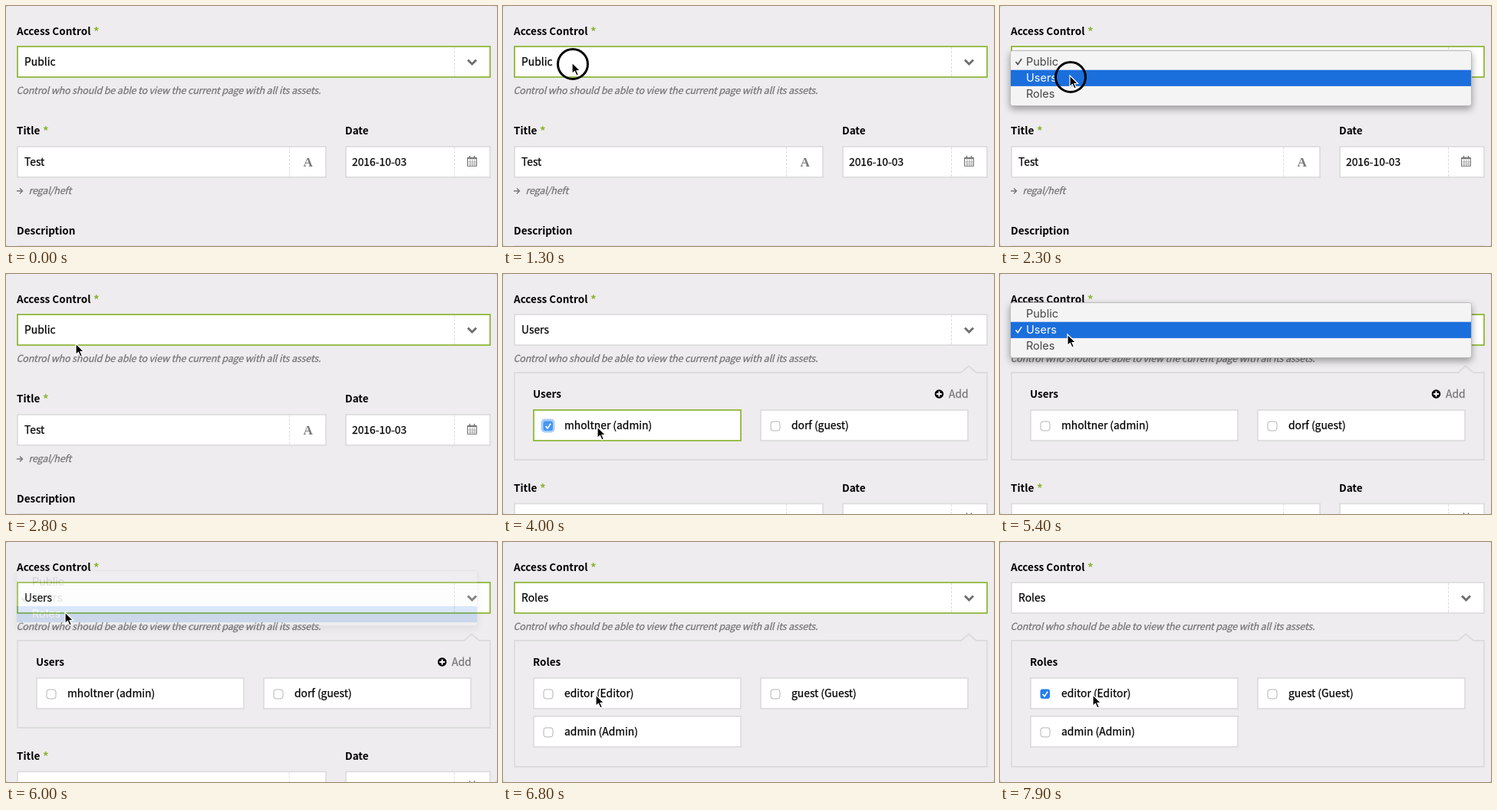
Recreate the animation shown at these times as an HTML page. Size 640x314 px, loop 8000 ms.

```html
<!DOCTYPE html>
<html lang="en">
<head>
<meta charset="utf-8">
<title>Access control form</title>
<style>
html, body { margin: 0; width: 100%; height: 100%; overflow: hidden; background: #d6d5d6; }
svg { display: block; width: 640px; height: 314px; }
text {
  font: 13.85px "Noto Sans CJK JP", "Noto Sans CJK SC", "Noto Sans CJK", "Noto Sans", sans-serif;
  fill: #000; stroke: #000; stroke-width: .25px;
}
.b { font-weight: bold; font-size: 13.5px; stroke: none; }
.star { font-weight: bold; font-size: 15px; fill: #8ab432; stroke: none; }
.i { font-style: italic; font-size: 12.5px; letter-spacing: -.15px; fill: #747474; stroke: #747474; }
.grey { fill: #777; stroke: #777; }
.serif { font: bold 17px "Liberation Serif", serif; fill: #777; stroke: none; }
.menu text { font: 14.5px Inter, sans-serif; fill: #444; stroke: none; }
.menu .on { fill: #fff; }
</style>
</head>
<body>
<svg id="stage" viewBox="0 0 640 314"></svg>
<script>
const LOOP = 8000, STEP = 100, ROW = 21.2;
const GREEN = '#8ab432', LINE = '#dddcdd', PAGE = '#eeecee';
const stage = document.getElementById('stage');

// Cursor tip: time, x, y
const path = [
  [200, 250, 296], [1100, 90, 74], [1500, 90, 74], [2000, 91, 91], [2900, 91, 91],
  [3400, 123, 200], [4500, 123, 200], [4900, 88, 73], [5200, 88, 74], [5400, 88, 79],
  [5700, 77, 92], [6200, 77, 92], [6800, 121, 200], [8000, 121, 200]
];
const clicks = [1300, 2200, 3500, 4300, 5000, 5700, 6900];
const menus = [
  { open: 1400, end: 2740, top: 59, checked: 0 },
  { open: 5100, end: 6040, top: 38, checked: 1 }
];
const options = ['Public', 'Users', 'Roles'];

const within = (t, a, b) => t >= a && t < b;
const text = (x, y, s, cls = '') => `<text x="${x}" y="${y}" class="${cls}">${s}</text>`;
const stroke = (d, color, width, more = '') =>
  `<path d="${d}" fill="none" stroke="${color}" stroke-width="${width}" ${more}/>`;
const rect = (x, y, w, h, fill, more = '') =>
  `<rect x="${x}" y="${y}" width="${w}" height="${h}" fill="${fill}" ${more}/>`;
const box = (x, y, w, focus) =>
  rect(x + 1, y + 1, w - 2, 40, '#fff', `stroke="${focus ? GREEN : LINE}" stroke-width="1.7"`);
const divider = (x, y) => stroke(`M${x} ${y + 2}v38`, LINE, 1, 'stroke-dasharray="3 2"');

function cursorAt(t) {
  const i = path.findIndex(p => p[0] > t);
  const [t0, x0, y0] = path[i - 1], [t1, x1, y1] = path[i];
  const k = (t - t0) / (t1 - t0), e = k * k * (3 - 2 * k);
  return [x0 + (x1 - x0) * e, y0 + (y1 - y0) * e];
}

function select(value, focus) {
  return text(14, 38, 'Access Control', 'b') + text(114, 39, '*', 'star') +
    box(14, 52, 618, focus) + text(24, 78.4, value) + divider(584.5, 52) +
    stroke('M602 70.5l5.5 5.5 5.5-5.5', '#707070', 3) +
    text(13.4, 115, 'Control who should be able to view the current page with all its assets.', 'i');
}

function calendar(x, y) {
  return stroke(`M${x + .5} ${y + 2.5}h12v11h-12z`, '#777', 1) +
    stroke(`M${x} ${y + 8}h13M${x} ${y + 11}h13` +
      `M${x + 4} ${y + 5}v8M${x + 7} ${y + 5}v8M${x + 10} ${y + 5}v8`, '#777', .6) +
    stroke(`M${x} ${y + 3.5}h13M${x + 3.5} ${y}v4M${x + 9.5} ${y}v4`, '#777', 1.6);
}

function fields(dy) {
  return `<g transform="translate(0 ${dy})">` +
    text(14, 168.4, 'Title', 'b') + text(48, 169, '*', 'star') +
    box(14, 183, 404) + text(24, 209.3, 'Test') + divider(369.5, 183) + text(387.5, 210, 'A', 'serif') +
    text(442, 168.4, 'Date', 'b') +
    box(442, 183, 190) + text(451, 209.3, '2016-10-03') + divider(584.5, 183) + calendar(601, 196) +
    stroke('M14 242h7.5M18 238.5l3.5 3.5-3.5 3.5', '#777', 1.4) + text(29.4, 246, 'regal/heft', 'i') +
    text(14, 299, 'Description', 'b') + box(14, 313, 618) + '</g>';
}

function option(x, y, label, checked, focus) {
  const cx = x + 13.5, cy = y + 15.5;
  const glow = focus ? rect(cx - 3, cy - 3, 18, 18, '#a9cdf6', 'rx="5"') : '';
  const mark = checked
    ? rect(cx, cy, 12.5, 12.5, focus ? '#4596f3' : '#2380ea', 'rx="3"') +
      stroke(`M${cx + 3} ${cy + 6.5}l2.5 3 4.2-6.2`, '#fff', 1.6)
    : rect(cx + .5, cy + .5, 12, 12, '#fff', 'rx="3" stroke="#b4b4b4"');
  return box(x, y, 272, focus) + glow + mark + text(x + 41, y + 26.4, label);
}

function panel(bottom, title, content) {
  return stroke(`M15 129H597L607 120.5 617 129H631V${bottom - 1}H15Z`, LINE, 1.8) +
    text(39, 162, title, 'b') + content;
}

function usersPanel(t) {
  const add = '<circle cx="568.5" cy="157" r="5.8"/>' +
    stroke('M565 157h7M568.5 153.5v7', '#fff', 2) + text(581, 162, 'Add', 'grey');
  return panel(244, 'Users', add +
    option(39, 177, 'mholtner (admin)', within(t, 3600, 4400), within(t, 3600, 4900)) +
    option(335, 177, 'dorf (guest)'));
}

function rolesPanel(t) {
  return panel(295, 'Roles',
    option(39, 177, 'editor (Editor)', t >= 7000, within(t, 7000, 7700)) +
    option(335, 177, 'guest (Guest)') + option(39, 227, 'admin (Admin)'));
}

function menu({ open, end, top, checked }, t, y) {
  if (!within(t, open, end)) return '';
  const first = top + 3.5;
  const active = Math.max(0, Math.min(2, Math.floor((y - first) / ROW)));
  const rows = options.map((name, i) => {
    const on = i === active, ry = first + i * ROW;
    return (on ? rect(14, ry, 600, ROW, '#1b6fdc') : '') +
      (i === checked ? stroke(`M20.5 ${ry + 10.5}l2.7 3.5 5-7.5`, on ? '#fff' : '#444', 1.5) : '') +
      text(34, ry + 15, name, on ? 'on' : '');
  });
  return `<g class="menu" opacity="${Math.min(1, (end - t) / 250)}">` +
    rect(13.5, top - .5, 601, 72, '#f5f4f5',
      'rx="3" stroke="#bbb" style="filter:drop-shadow(0 4px 5px rgba(0,0,0,.35))"') +
    rows.join('') + '</g>';
}

function cursor(t, [x, y]) {
  const ring = clicks.some(c => within(t, c, c + 250))
    ? `<circle cx="${x + 1}" cy="${y + 2}" r="19.5" fill="none" stroke="#000" stroke-width="3"/>` : '';
  return ring + `<path transform="translate(${x} ${y})" d="M0 0V14.5L3.4 11.5 5.8 17 8.4 15.9 6 10.5H10.6Z"
    fill="#000" stroke="#fff" stroke-width="1.2"/>`;
}

function scene(t) {
  const mode = t < 2900 ? 0 : t < 6200 ? 1 : 2;
  const focused = !within(t, 3600, 4900) && t < 7000;
  const shown = t >= path[0][0];
  const tip = shown ? cursorAt(t) : [0, 0];
  return rect(0, 0, 640, 314, PAGE, 'rx="4"') +
    select(options[mode], focused) +
    fields([0, 116.5, 167][mode]) +
    ['', usersPanel(t), rolesPanel(t)][mode] +
    menus.map(m => menu(m, t, tip[1])).join('') +
    (shown ? cursor(t, tip) : '');
}

let start, last;
function tick(now) {
  start ??= now;
  const t = Math.floor((now - start) % LOOP / STEP) * STEP;
  if (t !== last) stage.innerHTML = scene(last = t);
  requestAnimationFrame(tick);
}
requestAnimationFrame(tick);
</script>
</body>
</html>
```
